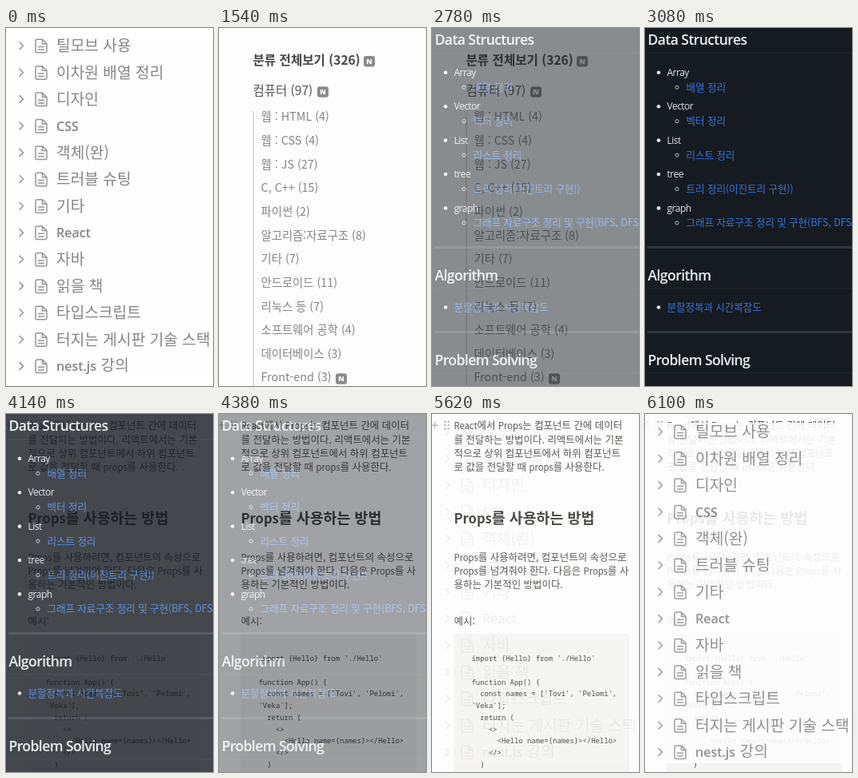
Recreate the animation shown at these times as an HTML page. Size 259 by 448 pixels, loop 6.16 s.

```html
<!DOCTYPE html>
<html lang="ko">
<head>
<meta charset="utf-8">
<title>Study notes</title>
<style>
html, body { margin: 0; width: 100%; height: 100%; overflow: hidden; background: #fff; }
body { position: relative; }
svg {
  position: absolute; inset: 0; width: 100%; height: 100%;
  font-family: "Noto Sans CJK KR", "Noto Sans CJK JP", sans-serif;
  animation: slide 6160ms linear infinite;
  animation-delay: calc(var(--i) * 1540ms - 6701ms);
}
/* Fade in on top in ten steps, stay below the next slide, then leave. */
@keyframes slide {
  0% { opacity: 0; z-index: 2; animation-timing-function: steps(10, start); }
  9.74% { opacity: 1; z-index: 2; animation-timing-function: step-end; }
  15% { opacity: 1; z-index: 1; animation-timing-function: step-end; }
  33.766% { opacity: 0; z-index: 0; animation-timing-function: step-end; }
  100% { opacity: 0; z-index: 0; }
}
text { white-space: pre; }

#pages text { font-size: 19.2px; font-weight: 300; fill: #858585; }
#pages .la { font: 600 16px "Open Sans", "Noto Sans", sans-serif; }
#pages path { fill: none; stroke: #959595; stroke-width: 1.5; stroke-linejoin: round; stroke-linecap: round; }

#topics text { font-size: 14.35px; font-weight: 500; fill: #858585; }
#topics .all { font-size: 15.6px; font-weight: 700; fill: #454545; }
#topics .group { font-size: 15.5px; fill: #555; }
#topics .new { font: 800 9px "Open Sans", "Noto Sans", sans-serif; fill: #fff; text-anchor: middle; }

#readme .head { font: 600 17.6px "Open Sans", "Noto Sans", sans-serif; letter-spacing: -.6px; fill: #e9eef3; }
#readme .item { font: 400 12px "Open Sans", "Noto Sans", sans-serif; letter-spacing: -.5px; fill: #dfe5eb; }
#readme .link { font-size: 12.6px; letter-spacing: -.1px; fill: #3474dc; }

#article text { font-size: 12.45px; fill: #4a4945; }
#article .la { font-size: .9em; }
#article .head { font-size: 18.4px; font-weight: 700; fill: #3a3935; }
#article .code { font: 8.92px "Noto Sans Mono", "DejaVu Sans Mono", monospace; fill: #3d3c38; }
</style>
</head>
<body>
<script>
const esc = s => s.replace(/</g, '&lt;').replace(/>/g, '&gt;');
const text = (x, y, s, cls = '') => `<text x="${x}" y="${y}" class="${cls}">${esc(s)}</text>`;
// Latin words get their own style next to Hangul.
const mixed = (x, y, s, cls = '') =>
  `<text x="${x}" y="${y}" class="${cls}">` +
  s.replace(/[A-Za-z]+(\.[a-z]+)?/g, '<tspan class="la">$&</tspan>') + '</text>';
const rect = (x, y, w, h, fill, r = 0) =>
  `<rect x="${x}" y="${y}" width="${w}" height="${h}" rx="${r}" fill="${fill}"/>`;
const dot = (x, y, r, fill, stroke = 'none') =>
  `<circle cx="${x}" cy="${y}" r="${r}" fill="${fill}" stroke="${stroke}"/>`;
const rows = (list, fn) => list.map(fn).join('');

function pages() {
  const names = ['틸모브 사용', '이차원 배열 정리', '디자인', 'CSS', '객체(완)', '트러블 슈팅', '기타',
    'React', '자바', '읽을 책', '타입스크립트', '터지는 게시판 기술 스택', 'nest.js 강의'];
  return rect(0, 11, 259, 426, '#fefefe') + rows(names, (s, i) => {
    const y = 22.3 + i * 33.4;
    const base = y + (/^[A-Za-z]/.test(s) ? 6.2 : 6.9);
    return `<g transform="translate(0 ${y})">
      <path d="M17 -4.5l4.5 4.5l-4.5 4.5"/>
      <path d="M45.5 -8h-6.5q-2 0 -2 2v12.5q0 2 2 2h10q2 0 2 -2v-9zv5.5h5.5M40.5 1.2h7M40.5 4.8h7"/>
      </g>` + mixed(63, base, s);
  });
}

function topics() {
  const names = ['웹 : HTML (4)', '웹 : CSS (4)', '웹 : JS (27)', 'C, C++ (15)', '파이썬 (2)',
    '알고리즘:자료구조 (8)', '기타 (7)', '안드로이드 (11)', '리눅스 등 (7)', '소프트웨어 공학 (4)',
    '데이터베이스 (3)', 'Front-end (3)'];
  const badge = (x, y) => rect(x - 7, y - 6.7, 14, 13.4, '#8b8b8b', 3) + text(x, y + 3.3, 'N', 'new');
  return rect(0, 0, 259, 448, '#fdfdfd') + rect(42, 104, 2, 344, '#dedede') +
    text(42.5, 45.5, '분류 전체보기 (326)', 'all') + badge(188, 41.7) +
    text(42.5, 83.5, '컴퓨터 (97)', 'group') + badge(130, 80) +
    rows(names, (s, i) => text(52.5, 116.3 + i * 29.65, s)) + badge(153, 439);
}

function readme() {
  const list = [['Array', '배열 정리'], ['Vector', '벡터 정리'], ['List', '리스트 정리'],
    ['tree', '트리 정리(이진트리 구현))'], ['graph', '그래프 자료구조 정리 및 구현(BFS, DFS)']];
  const heads = [['Data Structures', 21], ['Algorithm', 315.5], ['Problem Solving', 421.5]];
  return rect(0, 0, 259, 448, '#161b21') +
    rows(heads, ([s, y]) => text(3.5, y, s, 'head') + rect(3, y + 10, 256, 1, '#22272e')) +
    rows([273, 379], y => rect(3, y, 256, 3, '#30353b')) +
    rows(list, ([name, link], i) => {
      const y = 55.3 + i * 42.4;
      return dot(17, y + .5, 2.3, '#dfe5eb') + text(27.5, y + 4.7, name, 'item') +
        dot(40, y + 19, 2.1, 'none', '#b9bfc5') + text(51.5, y + 23.4, link, 'link');
    }) +
    dot(17, 349.5, 2.3, '#dfe5eb') + text(27.5, 354, '분할정복과 시간복잡도', 'link');
}

function article() {
  const intro = ['React에서 Props는 컴포넌트 간에 데이터', '를 전달하는 방법이다. 리액트에서는 기본',
    '적으로 상위 컴포넌트에서 하위 컴포넌트', '로 값을 전달할 때 props를 사용한다.'];
  const usage = ['Props를 사용하려면, 컴포넌트의 속성으로', 'Props를 넘겨줘야 한다. 다음은 Props를 사',
    '용하는 기본적인 방법이다.'];
  const code = ["import {Hello} from './Hello'", '', 'function App() {',
    "  const names = ['Tovi', 'Pelomi',", "'Veka'];", '  return (', '    <>',
    '      <Hello name={names}></Hello>', '    </>', '  )'];
  const grip = rows([9.7, 14, 18.3], y => dot(16.2, y, 1.2, '#b4b4b2') + dot(20.6, y, 1.2, '#b4b4b2'));
  return rect(0, 0, 259, 448, '#fdfdfd') +
    '<path d="M-1 14h9M3.5 9.5v9" stroke="#b4b4b2" stroke-width="1.3"/>' + grip +
    rows(intro, (s, i) => mixed(27.5, 19.3 + i * 17.35, s)) +
    mixed(27.5, 137.3, 'Props를 사용하는 방법', 'head') +
    rows(usage, (s, i) => mixed(27.5, 183.5 + i * 17.35, s)) +
    mixed(27.5, 263.7, '예시:') +
    rect(27, 275, 220, 180, '#f5f4f2', 3) +
    rows(code, (s, i) => text(49.5, 309 + i * 14.75, s, 'code'));
}

document.body.innerHTML = [pages, topics, readme, article].map((draw, i) =>
  `<svg id="${draw.name}" style="--i:${i}" viewBox="0 0 259 448">${draw()}</svg>`).join('');
</script>
</body>
</html>
```
